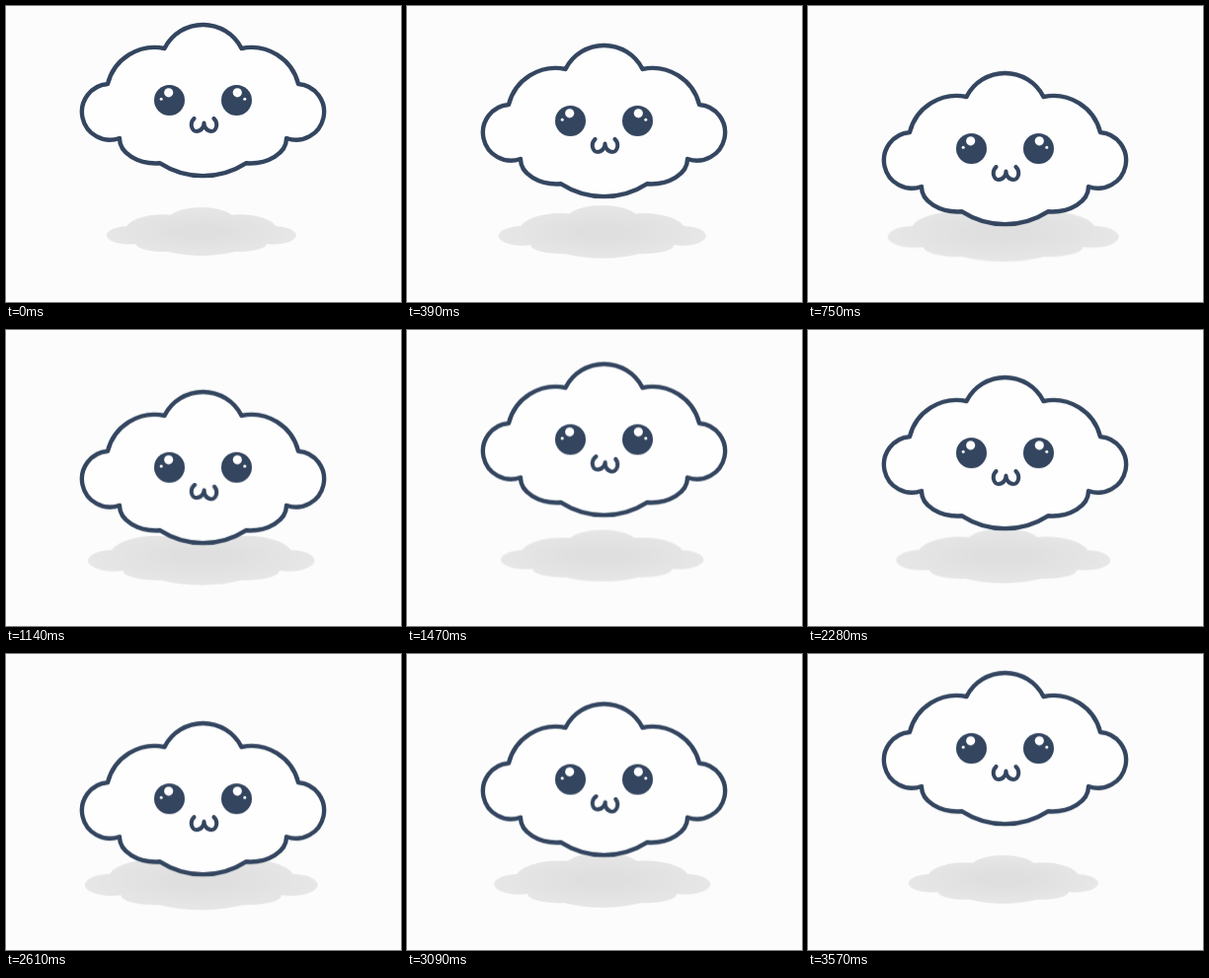
Recreate the animation shown at these times as an HTML page without scripts. Size 400x300 px, loop 3600 ms.

```html
<!DOCTYPE html>
<html lang="en">
<head>
<meta charset="utf-8">
<title>Floating cloud</title>
<style>
  html, body { margin: 0; width: 100%; height: 100%; overflow: hidden; background: #fcfcfc; }
  svg { display: block; width: 100%; height: 100%; }

  .ink { fill: #33455f; }
  .line { stroke: #33455f; stroke-linecap: round; stroke-linejoin: round; }

  /* The bezier approximates half a cosine wave. */
  .cloud, .shadow { animation: 900ms cubic-bezier(.364, 0, .636, 1) infinite alternate; }
  .cloud { animation-name: sink; }
  .shadow { animation-name: grow; transform-origin: 197.7px 225px; }
  .mouth { animation: tilt 1800ms ease-in-out infinite; transform-origin: 200.5px 120.5px; }

  @keyframes sink { to { transform: translateY(52.5px); } }
  @keyframes grow { to { transform: scale(1.233); } }
  @keyframes tilt {
    0%, 50%, 100% { transform: rotate(0deg); }
    75% { transform: rotate(9deg); }
  }
</style>
</head>
<body>
<svg viewBox="0 0 400 300">
  <defs>
    <path id="puff" d="M160.5 43 A43.7 43.7 0 0 1 238.5 43 A49 49 0 0 1 296 79
      A28.4 28.4 0 1 1 284 134 A37 25 0 0 1 243 159.3 A80.3 80.3 0 0 1 156 159.3
      A37 25 0 0 1 115 134 A28.4 28.4 0 1 1 103 79 A49 49 0 0 1 160.5 43 Z"/>
    <radialGradient id="shade">
      <stop offset=".2" stop-color="#dfdfdf"/>
      <stop offset="1" stop-color="#e7e7e7"/>
    </radialGradient>
    <g id="eye">
      <circle class="ink" cx="165.5" cy="95.5" r="15.5"/>
      <g fill="#fefefe">
        <circle cx="164.7" cy="87.8" r="4.6"/>
        <circle cx="157.2" cy="94.2" r="1.5"/>
      </g>
    </g>
  </defs>

  <g class="shadow">
    <use href="#puff" fill="url(#shade)" transform="translate(197.7 228.5) scale(.784 .321) translate(-199.5 -95.5)"/>
  </g>

  <g class="cloud">
    <use href="#puff" class="line" fill="#fefefe" stroke-width="4.4"/>
    <use href="#eye"/>
    <use href="#eye" transform="matrix(-1 0 0 1 399 0)"/>
    <path class="mouth line" fill="none" stroke-width="4" d="M190.5 114 C185.5 119 188 127 193 127
      S200.5 122 200.5 118.5 C200.5 122 203 127 208 127 S215.5 119 210.5 114"/>
  </g>
</svg>
</body>
</html>
```
